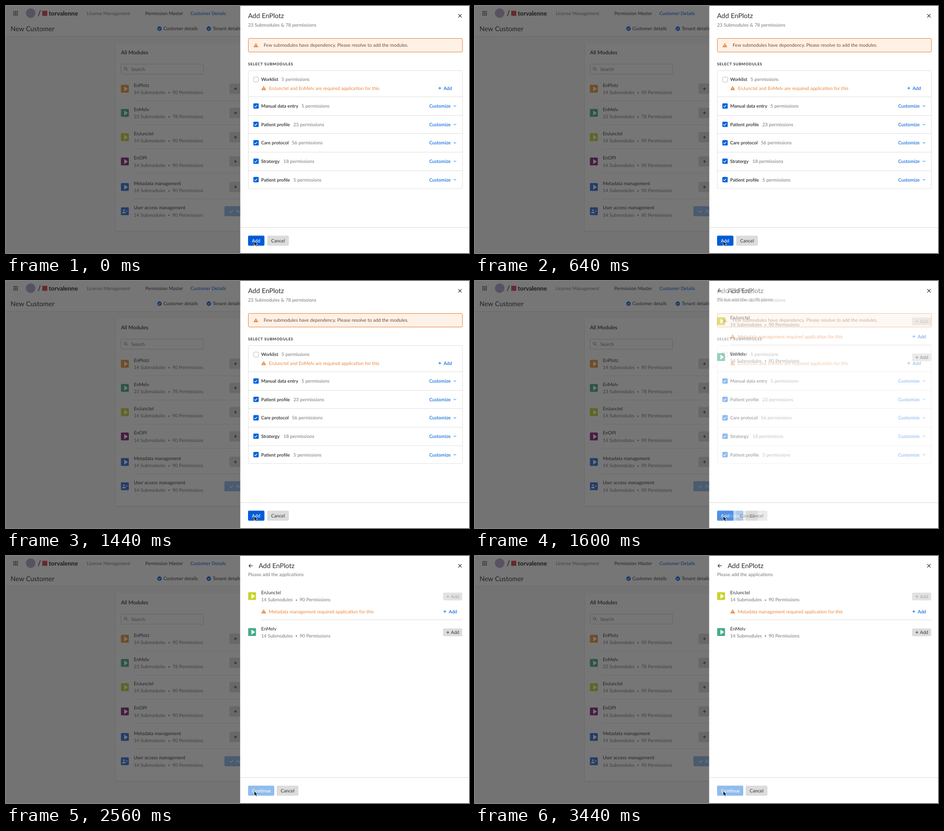
An HTML page that plays this animation: 920x491 px, repeating every 3.52 s.

```html
<!DOCTYPE html>
<html lang="en">
<head>
<meta charset="utf-8">
<title>Add module</title>
<style>
  html, body { margin: 0; width: 100%; height: 100%; overflow: hidden; background: #fff; }
  svg { display: block; width: 100vw; height: 100vh; }
  text { font-family: Lato, "Open Sans", sans-serif; word-spacing: .02em; text-rendering: geometricPrecision; white-space: pre; }
</style>
</head>
<body>
<svg id="stage" viewBox="0 0 920 491"></svg>
<script>
const INK = '#2b2b2b', GREY = '#757575', BLUE = '#0061dc', ORANGE = '#e9873d', LINE = '#e1e1e1';
const BUTTON = '#dcdcdc', PALE_BLUE = '#8fbcee', LIME = '#c8d32b', GREEN = '#45ad86';

// Drawing helpers, each returning SVG markup
const text = (x, y, s, fill = INK, size = 9.25, weight = 400, extra = '') =>
  `<text x="${x}" y="${y}" fill="${fill}" font-size="${size}" font-weight="${weight}" ${extra}>${s}</text>`;
const rect = (x, y, w, h, fill, r = 0, stroke = 'none', opacity = 1) =>
  `<rect x="${x}" y="${y}" width="${w}" height="${h}" rx="${r}" fill="${fill}" stroke="${stroke}" opacity="${opacity}"/>`;
const circle = (x, y, r, fill) => `<circle cx="${x}" cy="${y}" r="${r}" fill="${fill}"/>`;
const path = (d, stroke, width = 1, fill = 'none') =>
  `<path d="${d}" fill="${fill}" stroke="${stroke}" stroke-width="${width}"/>`;
const hline = (x1, x2, y, color = LINE) => path(`M${x1} ${y}H${x2}`, color);
const plus = (x, y, color, r = 2.7) => path(`M${x - r} ${y}h${2 * r}M${x} ${y - r}v${2 * r}`, color);
const tick = (x, y, color, k = 1) =>
  path(`M${x - 2.8 * k} ${y}l${2 * k} ${2 * k}l${3.6 * k} ${-4 * k}`, color, 1.2);
const warning = (x, y) =>
  path(`M${x} ${y - 3.7}L${x + 4.2} ${y + 3.5}H${x - 4.2}Z`, ORANGE, .8, ORANGE) +
  path(`M${x} ${y - 1.4}v2.4M${x} ${y + 1.7}v1`, '#fff', .9);
const play = (x, y, color) =>
  rect(x, y, 15.6, 15.6, color, 1.5) + path(`M${x + 6.5} ${y + 3}l7.3 5l-7.3 5Z`, 'none', 0, '#fff');
const counts = (x, y, modules, permissions) =>
  text(x, y, `${modules} Submodules`, GREY) + circle(x + 70, y - 2.7, 1.3, GREY) +
  text(x + 76.4, y, `${permissions} Permissions`, GREY);
const button = (x, y, w, h, fill, label, color, inset) =>
  rect(x, y, w, h, fill, 2) + text(x + inset, y + h / 2 + 3.3, label, color, 9.25, 500);

function page() {
  const modules = [
    ['EnPlotz', 164.5, '#f29432', 14, 90],
    ['EnMelv', 212.5, GREEN, 23, 78],
    ['EnJunctel', 260.8, LIME, 14, 90],
    ['EnOPI', 309, '#8a1f7a', 14, 90],
    ['Metadata management', 359.7, '#2f6fe0', 14, 90],
    ['User access management', 408, '#2f6fe0', 14, 90],
  ];
  let s = rect(0, 0, 470, 491, '#f8f8f8') + rect(0, 0, 470, 60, '#fff') + hline(0, 470, 60.5);
  for (let i = 0; i < 9; i++) s += rect(14.8 + i % 3 * 3.3, 10.2 + Math.floor(i / 3) * 3.3, 2, 2, INK);
  s += circle(49, 14.3, 9.5, '#b3a5cf') + path('M64.3 20L68.3 8.5', INK, 1.2) +
    rect(72, 9.5, 10, 10, '#e03a4e') +
    text(85, 18.8, 'torvalenne', INK, 12, 800) +
    text(160.8, 17.8, 'License Management', GREY) +
    text(276.8, 17.8, 'Permission Master') +
    text(366.5, 17.8, 'Customer Details', BLUE, 9.25, 500) +
    text(9, 50, 'New Customer', INK, 13.25);
  for (const [x, label] of [[305, 'Customer details'], [403, 'Tenant details']])
    s += circle(x, 45, 4.4, BLUE) + tick(x, 45, '#fff', .7) + text(x + 7.7, 48.4, label);

  s += rect(217, 74, 260, 374.5, '#e6e6e6', 3) + rect(218, 74, 260, 373, '#fff', 2) +
    text(228.5, 95.5, 'All Modules', INK, 10.3, 600) +
    rect(228.5, 115.5, 164, 20, 'none', 1, '#d4d4d4') +
    `<circle cx="237.5" cy="124.3" r="2.5" fill="none" stroke="${GREY}"/>` +
    path('M239.4 126.2l2.5 2.5', GREY) +
    text(249, 129, 'Search', GREY);
  modules.forEach(([name, y, color, subs, perms], i) => {
    const last = i === modules.length - 1;
    s += last
      ? rect(228.4, y - 7.8, 15.6, 15.6, color, 1.5) + circle(234.3, y - 2, 1.8, '#fff') +
        path(`M230.8 ${y + 4}q0-3 3.5-3t3.5 3Z`, 'none', 0, '#fff') + plus(240, y - .5, '#fff', 1.6)
      : play(228.4, y - 7.8, color);
    s += text(254, y - 3.6, name) + counts(254, y + 10.6, subs, perms);
    s += last
      ? rect(434, y - 10, 40, 20, PALE_BLUE, 2) + tick(448, y, '#fff', 1.2) + text(457, y + 3.3, 'Added', '#fff')
      : rect(444, y - 10.3, 30, 20.6, BUTTON, 2) + plus(456, y, INK, 3) + hline(254, 470, Math.round(y + 23) + .5, '#e8e8e8');
  });
  return s + rect(0, 0, 470, 491, '#1b1b1b', 0, 'none', .6);
}

// Parts shared by both panel views
const panel = () =>
  rect(465.5, 0, 455, 491, '#fff') + hline(466, 920, 440.5, '#dcdcdc') +
  path('M898.7 16.2l6.6 6.6M905.3 16.2l-6.6 6.6', INK, 1.1);

function submodules() {
  const rows = [['Manual data entry', 5, 80], ['Patient profile', 23, 64], ['Care protocol', 56, 61],
    ['Stratergy', 18, 44.3], ['Patient profile', 5, 64]];
  let s = panel() + text(481, 24.2, 'Add EnPlotz', INK, 13.25) +
    text(481, 40.8, '23 Submodules &amp; 78 permissions', GREY) +
    rect(481.5, 64.5, 425.5, 27, '#fdf1e8', 2, ORANGE) + warning(496.5, 78) +
    text(512, 81.3, 'Few submodules have dependency. Please resolve to add the modules.', '#7b4a26') +
    text(481, 117.8, 'SELECT SUBMODULES', INK, 7.4, 700, 'letter-spacing=".7"') +
    rect(481.5, 128.5, 425.5, 234.5, '#fff', 2, LINE) +
    rect(492, 141.3, 9.8, 9.8, '#fff', 1.5, '#bdbdbd') +
    text(507, 149.4, 'Worklist', INK, 9.1, 600) + text(547.3, 149.4, '5 permissions', GREY) +
    warning(512, 163.3) +
    text(522.5, 166.8, 'EnJunctel and EnMelv are required application for this', ORANGE) +
    plus(862, 163.3, BLUE) + text(869.5, 166.8, 'Add', BLUE, 9.25, 500);
  rows.forEach(([name, count, offset], i) => {
    const y = 198.7 + i * 36.6;
    s += hline(482, 907, Math.round(y - 18.5) + .5) +
      rect(491.5, y - 5.3, 10.6, 10.6, BLUE, 1.5) + tick(496.4, y + .2, '#fff') +
      text(507, y + 3.4, name, INK, 9.1, 600) + text(507 + offset, y + 3.4, `${count} permissions`, GREY) +
      text(841, y + 3.4, 'Customize', BLUE, 9.25, 500) + path(`M889.8 ${y - 1}l2.2 2.2l2.2-2.2`, BLUE);
  });
  return s + button(481, 456.5, 32.5, 20, '#005bd8', 'Add', '#fff', 7.6) +
    button(519, 456.5, 43, 20, BUTTON, 'Cancel', '#404040', 7.8);
}

function applications() {
  const app = (y, name, color, fill, ink) =>
    play(481.2, y, color) + text(507, y + 4.3, name) + counts(507, y + 18.4, 14, 90) +
    rect(868.5, y + .8, 38, 15.5, fill, 2) + plus(878, y + 8.6, ink) +
    text(884, y + 12, 'Add', ink);
  return panel() + path('M490.5 19.5H482.7M486 16.2l-3.3 3.3l3.3 3.3', INK, 1.1) +
    text(502, 24.2, 'Add EnPlotz', INK, 13.25) + text(481, 40.4, 'Please add the applications', GREY) +
    app(72, 'EnJunctel', LIME, '#e2e2e2', '#a9a9a9') +
    warning(512, 110.3) + text(522, 113.7, 'Metadata management required application for this', ORANGE) +
    plus(872, 110.3, BLUE) + text(879.7, 113.7, 'Add', BLUE, 9.25, 500) + hline(507, 907, 126.8, '#dcdcdc') +
    app(143.3, 'EnMelv', GREEN, BUTTON, '#3c3c3c') +
    button(481, 456.5, 52, 20, PALE_BLUE, 'Continue', '#fff', 7.8) +
    button(538, 456.5, 43, 20, BUTTON, 'Cancel', '#404040', 7.8);
}

const cursor = path('M493.2 467.3v9.4l2.2-2l1.5 3.4l1.7-.8l-1.5-3.2h2.9Z', '#fff', .8, '#000');
document.getElementById('stage').innerHTML =
  page() + submodules() + `<g id="next">${applications()}</g>` + cursor;

// The second view dissolves in over the first, then the loop cuts back
const LOOP = 3520, STEP = 80, START = 1500, FADE = 300;
const next = document.getElementById('next');
function draw() {
  const t = Math.floor(performance.now() % LOOP / STEP) * STEP;
  const p = Math.min(1, Math.max(0, (t - START) / FADE));
  next.setAttribute('opacity', 1 - (1 - p) ** 2);
  requestAnimationFrame(draw);
}
draw();
</script>
</body>
</html>
```
